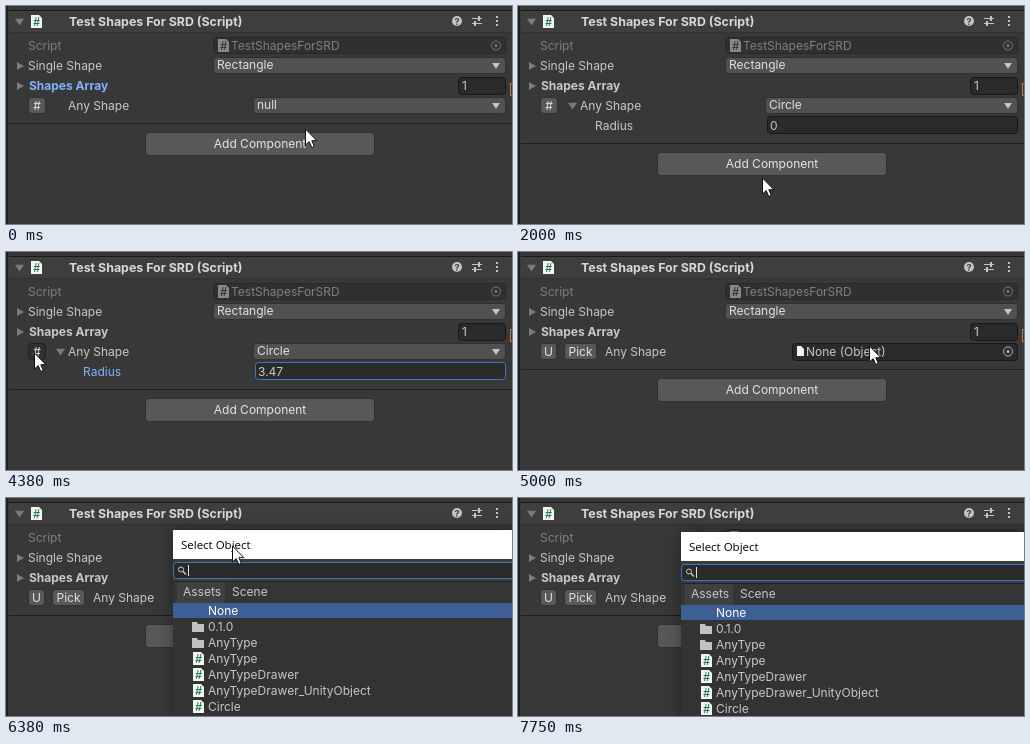
These frames come from a looping animation (506x218 px, 8000 ms). An HTML page with a canvas:

```html
<!DOCTYPE html>
<html lang="en">
<head>
<meta charset="utf-8">
<title>Inspector</title>
<style>
  html, body { margin: 0; width: 100%; height: 100%; overflow: hidden; background: #383838; }
  canvas { display: block; }
</style>
</head>
<body>
<canvas id="stage" width="506" height="218"></canvas>
<script>
const ctx = document.getElementById('stage').getContext('2d');
const LOOP = 8000, STEP = 125;
const INK = '#c8c8c8', BLUE = '#80b3fd', FOCUS = '#3a79bb', SELECT = '#3e5f96';

// Key poses as [step, x, y]
const pointerPath = [
  [0, 299, 123], [1, 282, 108], [2, 264, 97], [6, 264, 97], [9, 280, 113], [11, 286, 123],
  [13, 290, 189], [15, 290, 189], [19, 106, 119], [20, 108, 119], [24, 222, 119], [25, 224, 119],
  [28, 28, 101], [37, 28, 101], [41, 458, 91], [43, 489, 95], [49, 489, 95],
  [50, 389, 64], [51, 226, 48], [53, 222, 50], [55, 222, 50], [58, 187, 90], [61, 485, 101]
];
const windowPath = [[46, 489, 63], [49, 489, 63], [50, 330, 47], [51, 167, 31], [53, 163, 33]];

function along(path, step) {
  const next = path.findIndex(key => key[0] >= step);
  if (next < 0) return path[path.length - 1].slice(1);
  if (next === 0) return path[0].slice(1);
  const [s0, x0, y0] = path[next - 1], [s1, x1, y1] = path[next];
  const f = (step - s0) / (s1 - s0);
  return [Math.round(x0 + (x1 - x0) * f), Math.round(y0 + (y1 - y0) * f)];
}

function rect(x, y, w, h, color) {
  ctx.fillStyle = color;
  ctx.fillRect(x, y, w, h);
}

function box(x, y, w, h, fill, border, radius = 3) {
  ctx.beginPath();
  ctx.roundRect(x + .5, y + .5, w - 1, h - 1, radius);
  ctx.fillStyle = fill;
  ctx.fill();
  ctx.lineWidth = 1;
  ctx.strokeStyle = border;
  ctx.stroke();
}

// y is the vertical middle of the capitals
function text(str, x, y, color = INK, font = '12px Inter, sans-serif', align = 'left') {
  ctx.font = font;
  ctx.textAlign = align;
  ctx.fillStyle = color;
  ctx.fillText(str, x, y + 4);
}
const bold = (str, x, y, color, align) => text(str, x, y, color, 'bold 12px Inter, sans-serif', align);

function polygon(points, fill, stroke) {
  ctx.beginPath();
  points.forEach(([x, y]) => ctx.lineTo(x, y));
  ctx.closePath();
  ctx.fillStyle = fill;
  ctx.fill();
  if (stroke) {
    ctx.lineWidth = 1;
    ctx.strokeStyle = stroke;
    ctx.stroke();
  }
}

function line(points, color, width = 1) {
  ctx.beginPath();
  points.forEach(([x, y]) => ctx.lineTo(x, y));
  ctx.lineWidth = width;
  ctx.strokeStyle = color;
  ctx.stroke();
}

function circle(x, y, r, color, filled) {
  ctx.beginPath();
  ctx.arc(x, y, r, 0, Math.PI * 2);
  ctx.lineWidth = 1;
  ctx.fillStyle = ctx.strokeStyle = color;
  filled ? ctx.fill() : ctx.stroke();
}

const arrowRight = (x, y) => polygon([[x, y - 4], [x + 7, y], [x, y + 4]], '#7b7b7b');
const arrowDown = (x, y, w = 8, color = '#7b7b7b') =>
  polygon([[x, y - w / 4], [x + w, y - w / 4], [x + w / 2, y + w / 2]], color);

function button(label, x, y, w, h, pressed) {
  box(x, y, w, h, pressed ? '#303030' : '#585858', pressed ? '#202020' : '#303030');
  text(label, x + w / 2, y + h / 2, '#e4e4e4', undefined, 'center');
}

function dropdown(label, x, y) {
  box(x, y, 500 - x, 17, '#515151', '#303030');
  text(label, x + 4, y + 8, '#e0e0e0');
  arrowDown(486, y + 8, 8, '#c4c4c4');
}

const field = (x, y, w, focused, h = 18) => box(x, y, w, h, '#2a2a2a', focused ? FOCUS : '#181818');

function picker(x, y, color) {
  circle(x, y, 4.5, color);
  circle(x, y, 1.5, color, true);
}

function page(x, y, w, h, color = '#f4f4f4') {
  polygon([[x, y], [x + w - 3, y], [x + w, y + 3], [x + w, y + h], [x, y + h]], color);
}

function scriptIcon(x, y, paper, ink = '#14793a') {
  page(x, y, 11, 13, paper);
  text('#', x + 5.5, y + 6.5, ink, 'bold 12px "Liberation Sans", sans-serif', 'center');
}

function folder(x, y) {
  polygon([[x, y], [x + 5, y], [x + 6, y + 2], [x + 12, y + 2], [x + 12, y + 10], [x, y + 10]], '#c2c2c2');
}

function searchField(x, y, w) {
  field(x, y, w, true, 17);
  circle(x + 8, y + 7.5, 2.5, '#c8c8c8');
  line([[x + 10, y + 9.5], [x + 13, y + 12.5]], '#c8c8c8', 1.5);
  rect(x + 15, y + 3, 1, 11, '#e0e0e0');
}

function header() {
  rect(0, 0, 1, 218, '#282828');
  rect(1, 0, 1, 218, '#1c1c1c');
  rect(3, 4, 503, 1, '#1a1a1a');
  rect(3, 5, 503, 21, '#3e3e3e');
  rect(3, 26, 503, 1, '#303030');
  arrowDown(9, 15, 9);
  scriptIcon(25, 9);
  text('Test Shapes For SRD (Script)', 63, 16, '#d8d8d8', 'bold 12.4px Inter, sans-serif');
  circle(451, 15, 5, '#c4c4c4', true);
  text('?', 451, 15, '#3e3e3e', 'bold 9px Inter, sans-serif', 'center');
  line([[466, 12.5], [476, 12.5]], '#c4c4c4');
  line([[466, 17.5], [476, 17.5]], '#c4c4c4');
  rect(472, 10, 2, 5, '#c4c4c4');
  rect(468, 15, 2, 5, '#c4c4c4');
  for (const y of [10, 14, 18]) rect(490, y, 2, 2, '#c4c4c4');
}

function inspector(step, hasRadius, objectMode) {
  header();
  text('Script', 22, 40, '#7e7e7e');
  box(207, 31, 293, 17, '#303030', '#282828');
  scriptIcon(212, 33, '#888', '#303030');
  text('TestShapesForSRD', 225, 40, '#808080');
  picker(490, 39.5, '#777');

  arrowRight(11, 60);
  text('Single Shape', 22, 60);
  dropdown('Rectangle', 207, 51);

  arrowRight(11, 80);
  bold('Shapes Array', 23, 80, step < 4 ? BLUE : INK);
  field(452, 71, 48);
  text('1', 456, 80);
  line([[506, 77.5], [504.5, 77.5], [504.5, 89.5], [506, 89.5]], '#c87a3c');

  if (objectMode) {
    button('U', 22, 91, 17, 17);
    button('Pick', 46, 91, 33, 17);
    text('Any Shape', 87, 100);
    field(274, 91, 226, step === 45);
    page(279, 94, 7, 10);
    text('None (Object)', 288, 100);
    picker(490, 99.5, '#b0b0b0');
  } else {
    button('#', 22, 91, 18, 17, step === 35 || step === 36);
    text('Any Shape', 62, 100);
    dropdown(hasRadius ? 'Circle' : 'null', 247, 91);
  }
  if (hasRadius) radiusRow(step);

  const bottom = hasRadius ? 137 : 117;
  rect(3, bottom, 503, 1, '#1e1e1e');
  button('Add Component', 139, bottom + 9, 230, 24);
}

function radiusRow(step) {
  const dragging = step >= 20;
  const dragged = dragging ? along(pointerPath, Math.min(step, 25))[0] - 108 : 0;
  arrowDown(50, 99, 9);
  text('Radius', 77, 120, dragging ? BLUE : INK);
  field(249, 110, 251, dragging);
  text(String(+(dragged * .0299).toFixed(2)), 252, 120);
}

function typePopup(hovered) {
  rect(247, 108, 253, 100, '#1a1a1a');
  rect(248, 109, 251, 98, '#383838');
  searchField(252, 113, 242);
  rect(248, 135, 251, 20, '#3c3c3c');
  bold('Types', 372.5, 145, '#d0d0d0', 'center');
  ['null', 'Circle', 'ColliderShape'].forEach((name, i) => {
    if (i === hovered) rect(248, 157 + i * 17, 238, 17, SELECT);
    text(name, 262, 165 + i * 17);
  });
  rect(487, 156, 12, 51, '#343434');
  polygon([[489, 165], [497, 165], [493, 161]], '#c4c4c4');
  box(488, 172, 10, 19, '#5f5f5f', '#5f5f5f');
  polygon([[489, 198], [497, 198], [493, 202]], '#c4c4c4');
}

function objectWindow(x, y) {
  const w = 506 - x;
  ctx.shadowColor = 'rgba(0, 0, 0, .35)';
  ctx.shadowBlur = 14;
  rect(x, y + 1, w + 20, 240 - y, '#333');
  ctx.shadowColor = 'transparent';

  rect(x, y + 1, w, 29, '#fff');
  text('Select Object', x + 8, y + 16, '#000', '11.5px "Open Sans", sans-serif');
  rect(x, y + 30, w, 22, '#3c3c3c');
  searchField(x, y + 33, 360);
  rect(x, y + 52, w, 22, '#353535');
  rect(x, y + 52, w, 1, '#232323');
  rect(x + 4, y + 53, 48, 21, '#404040');
  text('Assets', x + 10, y + 63);
  text('Scene', x + 59, y + 63);
  rect(x, y + 74, w, 15, SELECT);
  const names = ['None', '0.1.0', 'AnyType', 'AnyType', 'AnyTypeDrawer',
    'AnyTypeDrawer_UnityObject', 'Circle', 'ColliderShape'];
  names.forEach((name, i) => {
    const rowY = y + 82 + i * 16;
    if (i > 2) scriptIcon(x + 20, rowY - 7);
    else if (i > 0) folder(x + 19, rowY - 5);
    text(name, x + 35, rowY, i ? INK : '#fff');
  });
}

function arrowPointer(x, y) {
  const shape = [[0, 0], [0, 16], [3.7, 12.6], [6.3, 18.5], [8.8, 17.4], [6.3, 11.7], [11.4, 11.7]];
  polygon(shape.map(([dx, dy]) => [x + dx + .5, y + dy]), '#fff', '#111');
}

function textPointer(x, y) {
  line([[x + .5, y - 7], [x + .5, y + 8]], '#eee');
  for (const dy of [-7.5, 8.5]) line([[x - 3, y + dy], [x + 4, y + dy]], '#eee');
}

function dragArrows(x, y) {
  polygon([[x - 6, y + 2], [x - 3, y - 1], [x - 3, y + 5]], '#fff', '#111');
  polygon([[x + 10, y + 2], [x + 7, y - 1], [x + 7, y + 5]], '#fff', '#111');
}

function pointer(step, popupOpen) {
  if ((step >= 46 && step < 50) || step >= 62) return;
  const [x, y] = along(pointerPath, step);
  if (popupOpen && y > 112 && y < 130) return textPointer(x, y);
  if (step >= 19 && step <= 25) dragArrows(x, y);
  arrowPointer(x, y);
}

function draw(step) {
  const popupOpen = step >= 4 && step < 15;
  const objectMode = step >= 37;
  rect(0, 0, 506, 218, '#383838');
  inspector(step, step >= 15 && !objectMode, objectMode);
  if (popupOpen) typePopup(step === 12 ? 0 : step > 12 ? 1 : -1);
  if (step >= 46) objectWindow(...along(windowPath, step));
  pointer(step, popupOpen);
}

function tick(now) {
  draw(Math.floor((now % LOOP) / STEP));
  requestAnimationFrame(tick);
}
requestAnimationFrame(tick);
</script>
</body>
</html>
```
